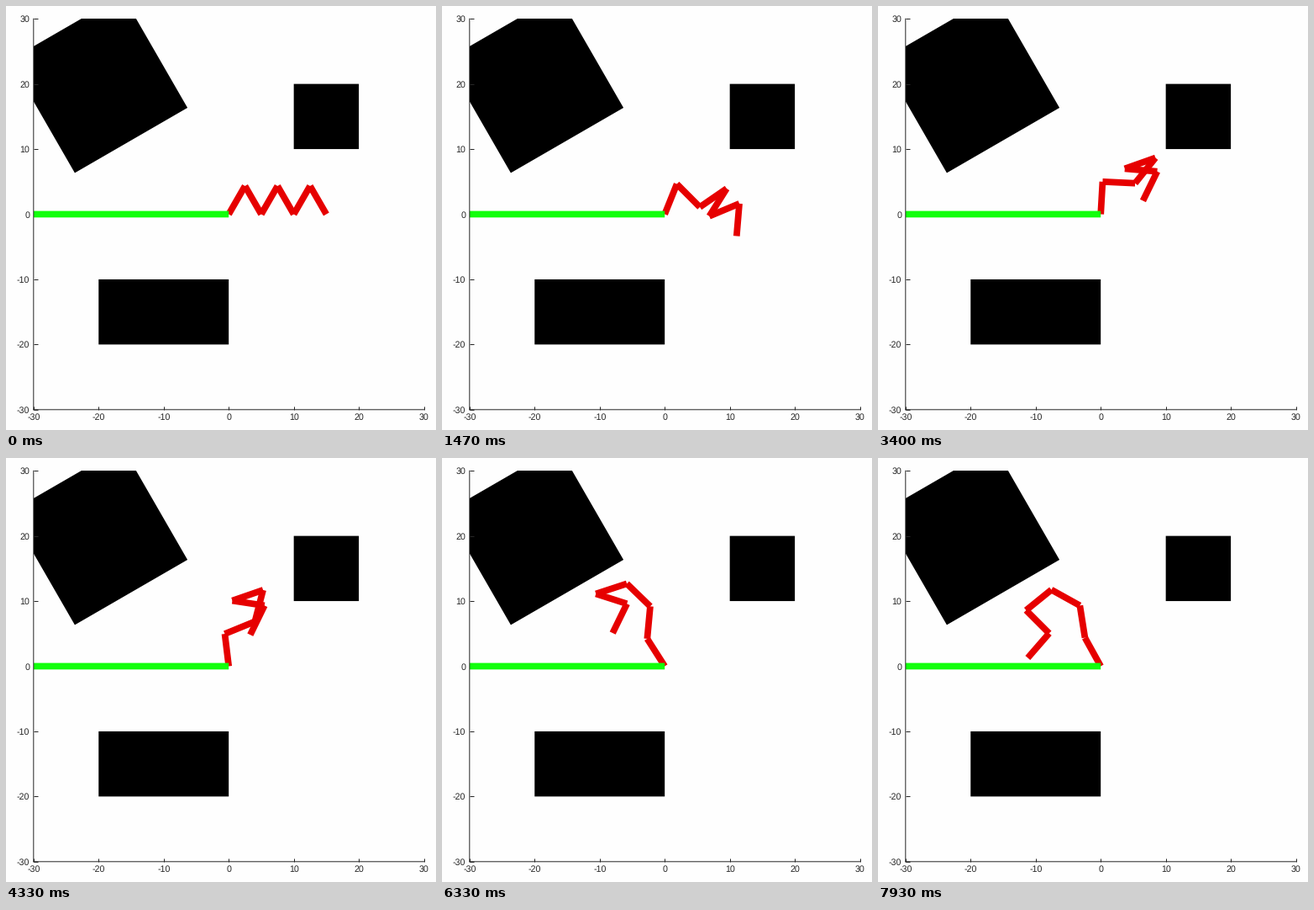
A matplotlib script for the animation above (8000 ms loop, 512 by 504 pixels).

```python
import numpy as np
import matplotlib.pyplot as plt
from matplotlib.animation import FuncAnimation
from matplotlib.patches import Polygon, Rectangle

W, H, DPI = 512, 504, 100
LEFT, RIGHT, TOP, BOTTOM = 32.8, 497.6, 15.2, 479.8
LOOP_MS, FRAME_MS = 8000, 20
LINK, THICK = 5, 1
PAPER, INK, RED, GREEN = "#fefefe", "#262626", "#e60000", "#12ff0c"

# Waypoints of the planned path: relative joint angles in degrees
WAY_STEPS = [0.5, 19, 50, 59]
WAYPOINTS = np.array([
    [60, -120, 120, -120, 120, -120],
    [73, -109, 55, -179, 160, -116],
    [126, -33, 51, -306, 143, -97],
    [119, -20, 52, -292, 96, -86],
])

# Pace of the path in whole steps, with a rest after each waypoint
PACE_MS = [200, 2270, 2600, 3530, 4730, 6670, 7000, 7930]
PACE_STEPS = [0, 19, 19, 28, 34, 50, 50, 59]


def box(x, y, w, h, color, **kw):
    ax.add_patch(Rectangle((x, y), w, h, fc=color, lw=0, snap=False, **kw))


def link_corners(start, angle):
    """Return the four corners of a link and its far joint."""
    along = np.array([np.cos(angle), np.sin(angle)])
    side = THICK / 2 * np.array([-along[1], along[0]])
    end = start + LINK * along
    return [start + side, end + side, end - side, start - side], end


def pose_at(ms):
    step = np.ceil(np.interp(ms, PACE_MS, PACE_STEPS))
    return [np.interp(step, WAY_STEPS, joint) for joint in WAYPOINTS.T]


def update(i):
    angles = np.radians(np.cumsum(pose_at((i + 0.75) * FRAME_MS)))
    joint = np.zeros(2)
    for patch, angle in zip(links, angles):
        corners, joint = link_corners(joint, angle)
        patch.set_xy(corners)
    return links


plt.rcParams.update({"font.family": "Liberation Sans", "text.hinting": "none"})
fig = plt.figure(figsize=(W / DPI, H / DPI), dpi=DPI, facecolor=PAPER)
ax = fig.add_axes([LEFT / W, 1 - BOTTOM / H,
                   (RIGHT - LEFT) / W, (BOTTOM - TOP) / H], facecolor=PAPER)
ax.set(xlim=(-30, 30), ylim=(-30, 30))

px = 72 / DPI
marks = range(-30, 31, 10)
ax.set_xticks(marks, [str(m) for m in marks])
ax.set_yticks(marks, [str(m) for m in marks])
ax.tick_params(direction="in", length=4.5 * px, width=px, pad=4.5 * px,
               color=INK, labelcolor=INK, labelsize=10.6 * px)
for name, spine in ax.spines.items():
    spine.set(visible=name in ("left", "bottom"), color=INK, linewidth=px,
              snap=False)

# Obstacles
box(10, 10, 10, 10, "black")
box(-20, -20, 20, 10, "black")
box(-30, 10, 20, 20, "black", angle=30, rotation_point="center")

links = [ax.add_patch(Polygon(np.zeros((4, 2)), fc=RED, lw=0, zorder=2))
         for _ in range(WAYPOINTS.shape[1])]
box(-30, -THICK / 2, 30, THICK, GREEN, zorder=2.2)

anim = FuncAnimation(fig, update, frames=LOOP_MS // FRAME_MS,
                     interval=FRAME_MS, repeat=True, repeat_delay=0)
plt.show()
```
